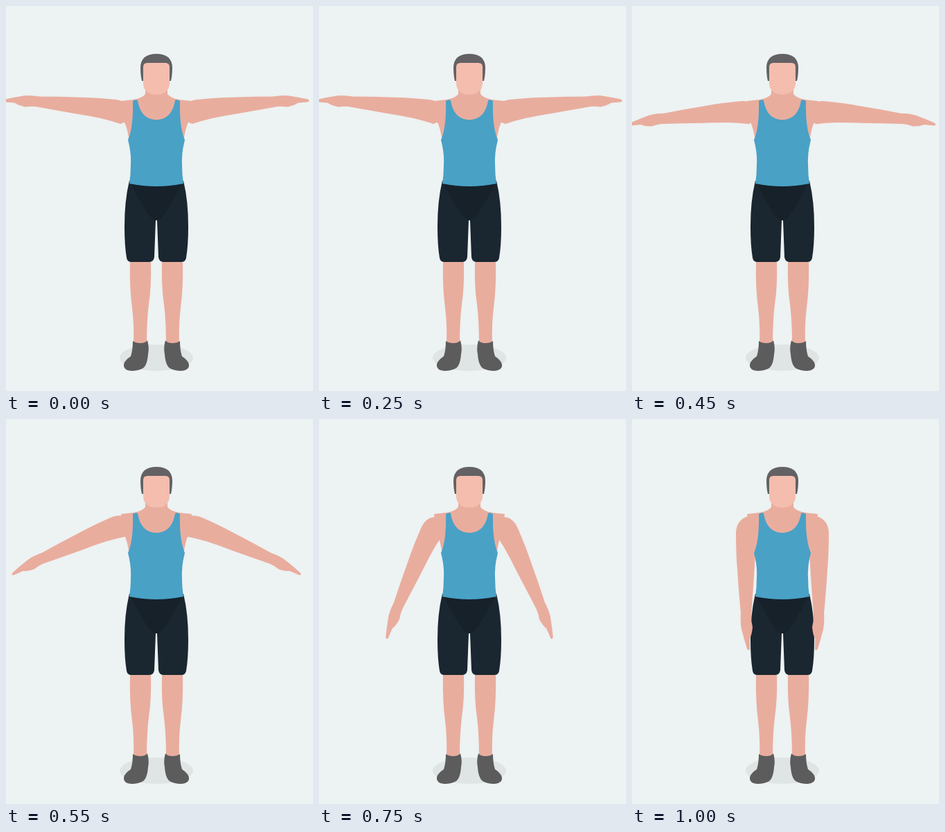
An HTML page for the animation above (1050 ms loop, 443 by 555 pixels).

```html
<!DOCTYPE html>
<html lang="en">
<head>
<meta charset="utf-8">
<title>Arm lowering</title>
<style>
  html, body { margin: 0; width: 100%; height: 100%; overflow: hidden; background: #edf2f2; }
  svg { display: block; width: 100%; height: 100%; }
  .skin { fill: #e9ad9e; }
  .shorts { fill: #1a2630; }
</style>
</head>
<body>
<svg viewBox="0 0 443 555">
  <ellipse cx="217" cy="507" rx="53" ry="19" fill="#dfe4e4"/>

  <path class="shorts" d="M178 252H256Q263 280 263 318Q263 345 260 363Q259 369 253 369H227Q221 369 220 362L218 309H216L214 362Q213 369 207 369H181Q175 369 174 363Q171 345 171 318Q171 280 178 252Z"/>
  <path d="M180 256H254Q240 284 228 301Q222 309 217 309Q212 309 206 301Q194 284 180 256Z" fill="#16212a"/>

  <g id="side">
    <path class="skin" d="M179 369H209Q210 405 206 430Q203 455 203 488H184Q185 460 182 435Q178 405 179 369Z"/>
    <path d="M183 483Q187 486 194 486Q201 486 204 482Q207 492 205 502Q204 517 198 522Q191 526 181 526Q169 525 170 517Q171 511 180 505Q183 496 183 483Z" fill="#5c5c5d"/>
    <path id="arm" class="skin" d="M8 -17Q-4 -15 -11 -8Q-17 -1 -17 10Q-17 40 -15 62Q-13 95 -10 125Q-11 138 -9 148L-5 163L-1 176Q1 180 3 177L3 161Q6 156 7 145Q5 137 5 130Q7 100 9 72Q10 50 12 30Q14 14 17 0Z"/>
  </g>
  <use href="#side" transform="matrix(-1 0 0 1 434 0)"/>

  <path class="skin" d="M201 108V127Q196 133 184 135L166 137L170 166Q175 174 178 196H256Q259 174 264 166L268 137L250 135Q238 133 233 127V108Z"/>
  <path d="M183 137Q187 134 190 136C193 155 203 164 217 164C231 164 241 155 244 136Q247 134 251 137Q250 175 258 193Q253 212 254 228Q254 243 256 256Q236 260 217 260Q198 260 178 256Q180 243 180 228Q181 212 176 193Q184 175 183 137Z" fill="#49a1c6"/>

  <path d="M196 108Q194 100 194 88Q195 69 217 69Q239 69 240 88Q240 100 238 108Z" fill="#636164"/>
  <path d="M198 88Q198 82 204 82H230Q236 82 236 88V112Q235 127 217 128Q199 127 198 112Z" fill="#f4bdae"/>
</svg>
<script>
  const LOOP = 1050, STEP = 50, START = 310, END = 960, RAISED = 96;
  const arm = document.getElementById("arm");

  const smooth = x => x * x * (3 - 2 * x);

  function draw(now) {
    const t = Math.floor(now % LOOP / STEP) * STEP;
    const progress = Math.min(1, Math.max(0, (t - START) / (END - START)));
    const lift = 1 - smooth(progress);
    // A raised arm sits slightly higher and looks slightly shorter.
    arm.setAttribute("transform",
      `translate(167 ${155 - 2 * lift}) rotate(${RAISED * lift}) scale(1 ${1 - 0.04 * lift})`);
  }

  const begin = performance.now();
  function tick() {
    draw(performance.now() - begin);
    requestAnimationFrame(tick);
  }
  tick();
</script>
</body>
</html>
```
